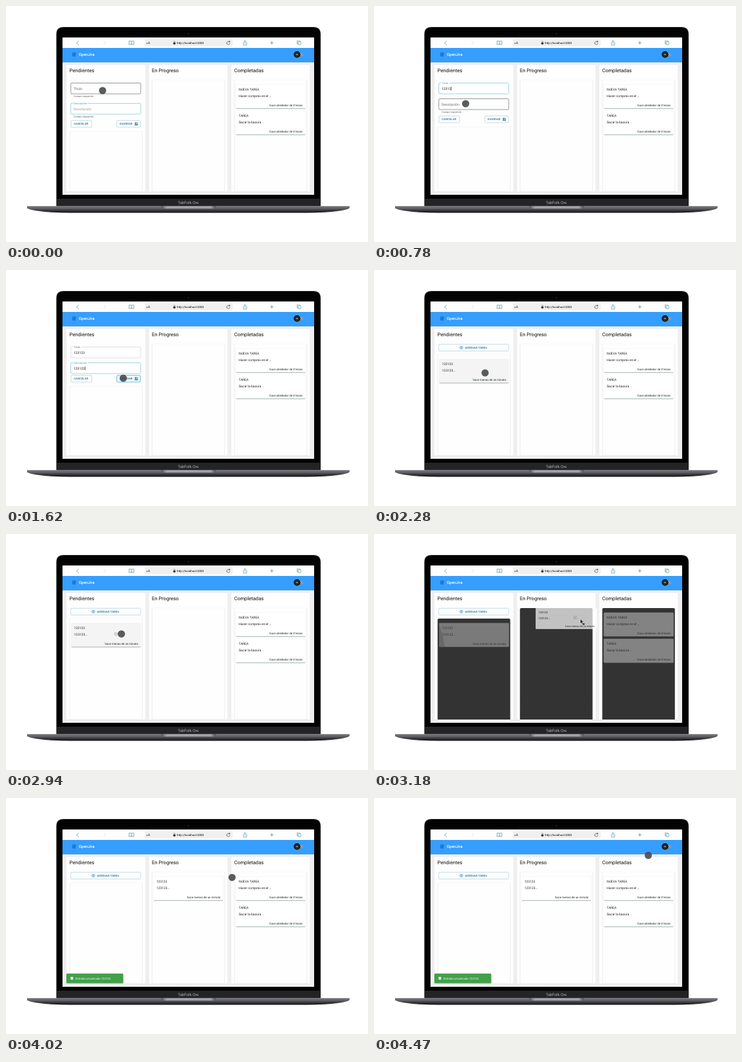
An HTML page for the animation above (4.5 s loop, 551x360 px).

```html
<!DOCTYPE html>
<html lang="es">
<head>
<meta charset="utf-8">
<title>OpenJira</title>
<style>
html, body { margin: 0; width: 100%; height: 100%; overflow: hidden; background: #fff; }
svg { display: block; width: 551px; height: 360px; }
text { font-family: Roboto, Arial, sans-serif; text-rendering: geometricPrecision; white-space: pre; }
</style>
</head>
<body>
<svg viewBox="0 0 551 360" xmlns="http://www.w3.org/2000/svg">
  <defs>
    <clipPath id="screen"><rect x="86" y="48" width="383" height="240"/></clipPath>
    <linearGradient id="slab" x2="0" y2="1">
      <stop offset="0" stop-color="#77787b"/><stop offset=".35" stop-color="#606164"/>
      <stop offset=".6" stop-color="#3c3d40"/><stop offset="1" stop-color="#151517"/>
    </linearGradient>
    <linearGradient id="notch">
      <stop offset="0" stop-color="#47484a"/><stop offset=".1" stop-color="#a0a1a4"/>
      <stop offset=".9" stop-color="#a0a1a4"/><stop offset="1" stop-color="#47484a"/>
    </linearGradient>
  </defs>
  <g id="laptop">
    <path d="M76.500 305V43q0-11 11-11H468q11 0 11 11V305z" fill="#2e2f30"/>
    <path d="M77.300 305V43.500q0-10.700 10.700-10.700H467.500q10.700 0 10.700 10.700V305z" fill="#030303"/>
    <rect x="77" y="294" width="401.500" height="11.5" fill="#242426"/>
    <circle cx="277.5" cy="42.5" r="1.1" fill="#20242c"/>
    <text x="277.5" y="302.2" font-size="6" fill="#b4b4b6" text-anchor="middle">TabFolk Oro</text>
    <path d="M32 305.3H523V308q-2 2.400-14 4.200q-22 3.300-52 3.300H98q-30 0-52-3.300q-12-1.800-14-4.200z" fill="url(#slab)"/>
    <path d="M236 305.3H320q-.6 3.6-5 3.6H241q-4.400 0-5-3.600z" fill="url(#notch)"/>
  </g>
  <g clip-path="url(#screen)">
    <g id="page"></g>
    <g id="live"></g>
  </g>
</svg>
<script>
const LOOP = 4500;
const INK = '#1e1e1e', BLUE = '#3ba6d0', TEAL = '#23708a', COLS = [92, 217.3, 342.6];

const rect = (x, y, w, h, fill, more = '') =>
  `<rect x="${x}" y="${y}" width="${w}" height="${h}" fill="${fill}" ${more}/>`;
const text = (x, y, size, str, fill = INK, more = '') =>
  `<text x="${x}" y="${y}" font-size="${size}" fill="${fill}" ${more}>${str}</text>`;
const line = (d, color, w = .7, more = '') =>
  `<path d="${d}" fill="none" stroke="${color}" stroke-width="${w}" ${more}/>`;
const dot = (x, y, r, fill, more = '') =>
  `<circle cx="${x}" cy="${y}" r="${r}" fill="${fill}" ${more}/>`;
const clamp = v => Math.min(1, Math.max(0, v));

function toolbar() {
  const c = '#4687a8';
  return rect(86, 48, 383, 17, '#fefefe') +
    rect(211, 51, 134, 10.4, '#f0f0f0', 'rx="2"') +
    line('M110.700 53l-3 3.200l3 3.200', c) +
    line('M148.800 53l3 3.200l-3 3.200', '#d5dde2') +
    line('M191 54v5M191 54q-1.600-.9-3.700-.5v5q2.100-.4 3.700.5q1.600-.9 3.700-.5v-5q-2.100-.4-3.700.5', c) +
    text(213.600, 58.200, 3.6, 'A') + text(216, 58.200, 5, 'A') +
    rect(254.700, 55.700, 3.200, 2.800, INK, 'rx=".4"') + line('M255.300 55.700v-.8a1 1 0 0 1 2 0v.8', INK, .5) +
    text(260, 57.900, 4.4, 'http://localhost:3000', '#000') +
    line('M340.400 55a2.400 2.400 0 1 0 .4 1.600M338.600 54.800h1.900v-1.900', INK, .6) +
    line('M362.600 55.300h-1.200v4.300h5v-4.300h-1.200M363.900 57.500v-5M362.400 54l1.500-1.500l1.500 1.500', c, .6) +
    line('M401.900 56.200h5.400M404.600 53.500v5.400', c) +
    line('M444.700 54.800h4.200v4.200h-4.200zM443 57.500v-4.300h4.200v1.600M443 57.500h1.700', c, .6);
}

function appBar() {
  const rays = Array.from({ length: 8 }, (_, i) => {
    const a = i * Math.PI / 4;
    return dot((443 + 2.800 * Math.cos(a)).toFixed(2), (74 + 2.800 * Math.sin(a)).toFixed(2), .45, '#ddd');
  }).join('');
  return rect(86, 64, 383, 22, '#359eff') +
    line('M101 72h5.200M101 74h5.200M101 76h5.200', '#123a66', .8) +
    text(110.800, 75.900, 5.9, 'OpenJira', '#fff', 'font-weight="500"') +
    rect(442, 71.400, 10.800, 5.200, '#8c9aa8', 'rx="2.600"') +
    dot(443, 74, 5.100, '#0d141b') + dot(443, 74, 1, '#ddd') + rays;
}

function page() {
  const heads = ['Pendientes', 'En Progreso', 'Completadas'];
  return rect(86, 48, 383, 240, '#efefef') + toolbar() + appBar() +
    COLS.map((x, i) => rect(x, 89.500, 120.300, 193.500, '#fefefe', 'stroke="#e8e8e8" stroke-width=".4"') +
      text(x + 4.600, 101, 7.6, heads[i], '#111')).join('');
}

function list(x, y, dark) {
  return dark
    ? `<path d="M${x + 4.800} 283V${y + 2}q0-2 2-2h106.600q2 0 2 2V283z" fill="#333"/>` +
      line(`M${x + 4.800} ${y + 2}V283M${x + 115.400} ${y + 2}V283`, '#aaa', .5, 'stroke-dasharray="1 1"')
    : rect(x + 5, y, 110.400, 282.500 - y, '#fefefe', 'stroke="#f1f1f1" stroke-width=".6"') +
      line(`M${x + 5} ${y}V282.500M${x + 115.400} ${y}V282.500`, '#e9e9e9', .5);
}

// kind: plain, hover, dim or ghost
function card(x, y, title, body, when, kind = 'plain') {
  const fill = { plain: '#fff', hover: '#f4f4f4', dim: '#838383', ghost: '#fff' }[kind];
  const solid = kind === 'plain' || kind === 'hover';
  const ink = kind === 'dim' ? '#2b2b2b' : INK;
  return rect(x, y, 106.500, 36.600, fill, `rx="1.300" ${kind === 'ghost' ? 'fill-opacity=".7"' : ''} ${solid ? 'stroke="#f0f0f0" stroke-width=".5"' : ''}`) +
    (solid ? line(`M${x + .6} ${y + 36.700}h105.300`, '#8a979d', .7) : '') +
    text(x + 4.600, y + 9.500, 4.850, title, ink) +
    text(x + 4.600, y + 19.200, 4.950, body, ink) +
    text(x + 102, y + 33, 4.4, when, ink, 'text-anchor="end"');
}

const task = (x, y, kind) => card(x, y, '123123', '123123...', 'hace menos de un minuto', kind);

function field(y, label, value, focus, hover, caret) {
  const up = focus || value;
  const edge = focus ? '#7cc3e0' : hover ? '#6a6e72' : '#d0d5d8';
  const w = label.length * 1.78 + 2.400;
  return rect(98.700, y, 106.300, 16.500, 'none', `rx="1.300" stroke="${edge}" stroke-width=".7"`) +
    (up ? rect(102, y - 1, w, 2, '#fefefe') + text(103.200, y + 1.600, 3.800, label, focus ? BLUE : '#666') : '') +
    (value ? text(103, y + 10.300, 5, value) : text(103, y + 10.300, 5.100, label, up ? '#999' : '#666')) +
    (caret ? rect(103.200 + value.length * 2.830, y + 5.700, .6, 5.600, INK) : '');
}

function button(x, y, w, label, tx, strong) {
  return rect(x, y, w, 10.300, strong ? '#f0f8fb' : '#fefefe', `rx="1.300" stroke="${strong ? BLUE : '#abd0da'}" stroke-width=".7"`) +
    text(tx, y + 6.700, 4.200, label, TEAL, 'font-weight="500" letter-spacing=".1"');
}

function form(t) {
  const typed = (from, step) => '123123'.slice(0, Math.max(0, Math.floor((t - from) / step) + 1));
  const title = typed(450, 75), desc = typed(1020, 75);
  const onTitle = t >= 180 && t < 930, onDesc = !onTitle;
  const dy = title ? 141.500 : 148.500;
  const help = y => text(103, y, 3.900, 'Campo requerido', '#666');
  const by = 160.700 + (title ? 0 : 7) + (desc ? 0 : 7);
  return list(COLS[0], by + 17, false) +
    field(117.500, 'Título', title, onTitle, t < 180, onTitle && title) +
    (title ? '' : help(139.300)) +
    field(dy, 'Descripción', desc, onDesc, t > 660 && t < 930, onDesc && desc) +
    (desc ? '' : help(dy + 21.500)) +
    button(98.900, by, 31.500, 'CANCELAR', 103.200) +
    button(168.600, by, 35.900, 'GUARDAR', 172.800, t > 1500) +
    line(`M196.400 ${by + 3.200}h3l.9.9v3h-3.900zM197.300 ${by + 3.400}v1h1.800M197.300 ${by + 7}v-1.300h2v1.300`, TEAL, .8);
}

const addButton = () => button(98.700, 113.300, 106.300, 'AGREGAR TAREA', 138.200) +
  `<circle cx="133" cy="118.400" r="2.200" fill="none" stroke="${TEAL}" stroke-width=".6"/>` +
  line('M131.900 118.400h2.200M133 117.300v2.200', TEAL, .5);

function snackbar(t) {
  const k = 1 - (1 - clamp((t - 3540) / 200)) ** 2;
  if (!k) return '';
  const x = 92 - 98 * (1 - k);
  const mix = (a, b) => Math.round(a + (b - a) * clamp((t - 3570) / 150));
  const fill = `rgb(${mix(65, 67)},${mix(110, 160)},${mix(70, 73)})`;
  return `<g transform="translate(${x.toFixed(2)} 0)">` +
    rect(-.5, 268.600, 87.400, 15, '#000', 'rx="1.500" opacity=".15"') +
    rect(0, 267.800, 86.400, 14.700, fill, 'rx="1.300"') +
    dot(8.300, 275, 2.300, '#fff') + line('M7.200 275l.8.8l1.500-1.600', fill, .6) +
    text(13.800, 276.600, 4.300, 'Entrada actualizada 123123', '#fff') + '</g>';
}

// time, x, y
const PATH = [
  [0, 147, 129], [420, 147, 129], [680, 139.500, 149], [1000, 139.500, 149], [1250, 142, 151],
  [1560, 178.500, 165], [1800, 178.500, 165], [2400, 168, 156], [2700, 167, 152.500], [2910, 167, 152.500],
  [2940, 175, 152.500], [3150, 306, 127.500], [3180, 314, 129.500], [3330, 314, 135], [3800, 314, 135],
  [4420, 417.500, 87.500], [4500, 417.500, 87.500]
];

function pointer(t) {
  const i = Math.max(1, PATH.findIndex(p => p[0] >= t));
  const [t0, x0, y0] = PATH[i - 1], [t1, x1, y1] = PATH[i];
  let k = clamp((t - t0) / (t1 - t0));
  if (t1 < 2900 || t0 > 3300) k = k * k * (3 - 2 * k);
  return [x0 + (x1 - x0) * k, y0 + (y1 - y0) * k];
}

function cursor(t, drag) {
  const [x, y] = pointer(t);
  const [px, py] = pointer(Math.max(0, t - 30));
  const trail = t > 2910 && t < 3300 ? dot(px, py, 3, '#888', 'opacity=".3"') : '';
  if (!drag) return trail + dot(x, y, 5.500, '#484a4c', 'opacity=".9"');
  return trail + `<path transform="translate(${x} ${y})" d="M0 0v7.200l1.700-1.500l1.200 2.600l1.300-.6l-1.200-2.500h2.300z" fill="#222" stroke="#fff" stroke-width=".5"/>` +
    rect(x + 3.500, y + 6.500, 3, 2.600, '#444', 'rx=".5"');
}

function live(t) {
  const editing = t < 1710, drag = t >= 2970 && t < 3360, moved = t >= 3360;
  const kind = drag ? 'dim' : 'plain';
  const ago = 'hace alrededor de 3 horas';
  let s = list(COLS[1], 113, drag) + list(COLS[2], 113, drag);
  s += editing ? form(t) : addButton() + list(COLS[0], 129, drag);
  if (!editing && !moved) {
    s += task(99, 135.700, drag ? 'dim' : t > 2000 ? 'hover' : 'plain');
    if (drag) s += rect(99, 135.700, 106.500, 36.600, '#555', 'rx="1.300" opacity=".2"') +
      '<path d="M99 137q6 17 9 35.300h-9z" fill="#555" opacity=".5"/>';
  }
  if (moved) s += task(224.300, 119.700);
  s += card(349.600, 119.700, 'NUEVA TAREA', 'Hacer compras en el ...', ago, kind) +
    card(349.600, 159.800, 'TAREA', 'Sacar la basura...', ago, kind);
  if (drag) {
    const [x, y] = pointer(t);
    s += `<g transform="translate(${x - 68} ${y - 16.700}) scale(.88)">${task(0, 0, 'ghost')}</g>`;
  }
  return s + snackbar(t) + cursor(t, drag);
}

const layer = document.getElementById('live');
document.getElementById('page').innerHTML = page();
function draw() {
  layer.innerHTML = live(performance.now() % LOOP);
  requestAnimationFrame(draw);
}
draw();
</script>
</body>
</html>
```
